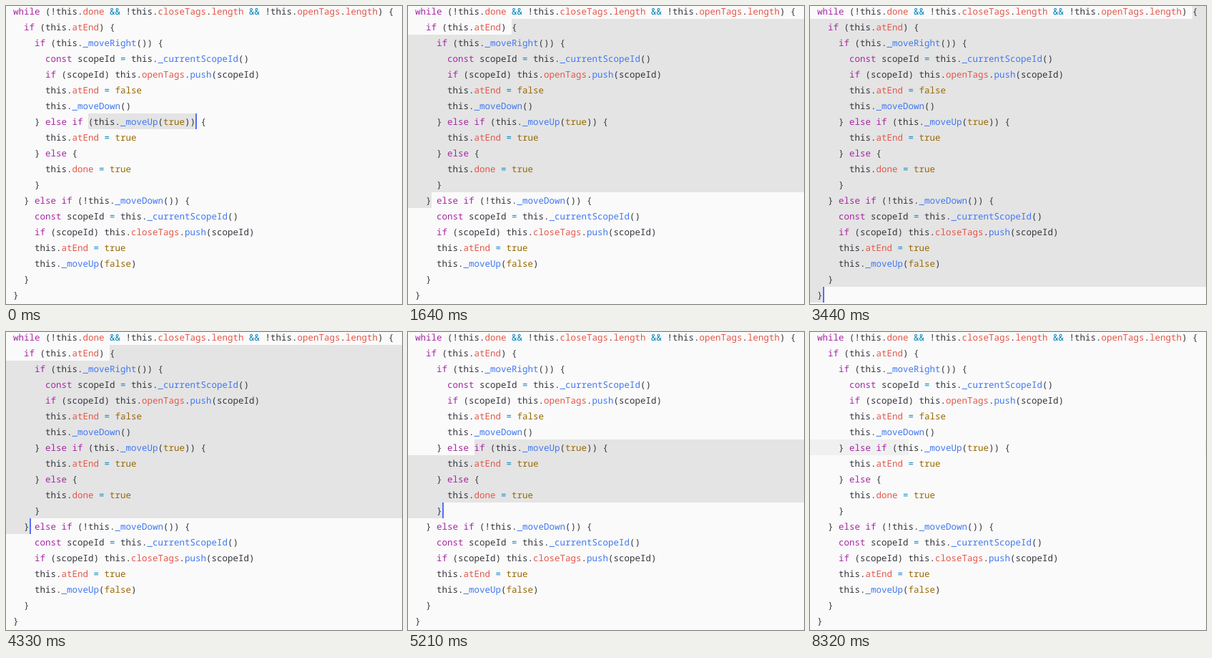
Animation, 554 px wide and 416 px high, one loop 8.57 s. Source, as an HTML page:

```html
<!DOCTYPE html>
<html lang="en">
<head>
<meta charset="utf-8">
<title>Growing and shrinking a code selection</title>
<style>
  html, body { margin: 0; width: 100%; height: 100%; overflow: hidden; background: #fafafa; }
  svg { display: block; width: 554px; height: 416px; }
  text { font: 12.5px "Noto Sans Mono", "DejaVu Sans Mono", monospace; white-space: pre; fill: #34363d; text-rendering: geometricPrecision; }
  .key { fill: #a626a4; }
  .call { fill: #4078f2; }
  .prop { fill: #e45649; }
  .bool { fill: #986801; }
  .op { fill: #0184bc; }
  .sel { fill: #e4e4e4; }
  .line { fill: #f0f0f0; }
  #cursor { fill: #526fff; }
</style>
</head>
<body>
<svg viewBox="0 0 554 416">
  <path id="area"/>
  <g id="code"></g>
  <rect id="cursor" width="2" height="22"/>
</svg>
<script>
const WIDTH = 554, ROW = 22, LOOP = 8570;
const colX = c => Math.round(10 + 7.5 * c);
const rowY = r => r * ROW - 4;
const byId = id => document.getElementById(id);
const area = byId('area'), cursor = byId('cursor');

const source = `while (!this.done && !this.closeTags.length && !this.openTags.length) {
  if (this.atEnd) {
    if (this._moveRight()) {
      const scopeId = this._currentScopeId()
      if (scopeId) this.openTags.push(scopeId)
      this.atEnd = false
      this._moveDown()
    } else if (this._moveUp(true)) {
      this.atEnd = true
    } else {
      this.done = true
    }
  } else if (!this._moveDown()) {
    const scopeId = this._currentScopeId()
    if (scopeId) this.closeTags.push(scopeId)
    this.atEnd = true
    this._moveUp(false)
  }
}`;

const rules = [
  ['key', /^(while|if|else|const)$/],
  ['bool', /^(true|false)$/],
  ['op', /^(&&|=)$/],
  ['call', /^(_\w+|push)$/],
  ['prop', /^(done|atEnd|length|\w+Tags)$/]
];

function paintLine(line, row) {
  const text = document.createElementNS('http://www.w3.org/2000/svg', 'text');
  text.setAttribute('y', rowY(row) + 16);
  for (const m of line.matchAll(/\w+|&&|[^\s\w]/g)) {
    const span = document.createElementNS('http://www.w3.org/2000/svg', 'tspan');
    const rule = rules.find(r => r[1].test(m[0]));
    if (rule) span.setAttribute('class', rule[0]);
    span.setAttribute('x', 10 + 7.5 * m.index);
    span.textContent = m[0];
    text.append(span);
  }
  byId('code').append(text);
}
source.split('\n').forEach(paintLine);

// Syntax nodes, innermost first: start row, start column, end row, end column
const nodes = [
  [7, 17, 7, 17],
  [7, 15, 7, 19],
  [7, 15, 7, 27],
  [7, 15, 7, 33],
  [7, 14, 7, 34],
  [7, 11, 11, 5],
  [2, 4, 11, 5],
  [1, 18, 12, 3],
  [1, 2, 17, 3],
  [0, 70, 18, 1],
  [0, 0, 18, 1]
];
// Key presses: time, node
const keys = [
  [0, 4], [440, 5], [890, 6], [1340, 7], [1940, 8], [2390, 9], [2840, 10],
  [3440, 9], [3880, 8], [4330, 7], [4770, 6], [5210, 5], [5650, 4],
  [6100, 3], [6390, 2], [6830, 1], [7130, 0]
];

const box = (x1, x2, y, h = ROW) => `M${x1} ${y}H${x2}v${h}H${x1}z`;

function selection([r1, c1, r2, c2]) {
  const x1 = colX(c1), x2 = colX(c2);
  if (r1 === r2) return box(x1, x2, rowY(r1));
  return box(x1, WIDTH, rowY(r1)) +
    box(0, WIDTH, rowY(r1 + 1), (r2 - r1 - 1) * ROW) +
    box(0, x2, rowY(r2));
}

function activeLine([row, col], t) {
  const y = rowY(row);
  return t < 8320 ? box(0, WIDTH, y) : box(0, colX(col), y) + box(WIDTH - 1, WIDTH, y);
}

function draw(now) {
  const t = now % LOOP;
  const [start, index] = keys.findLast(k => k[0] <= t);
  const node = nodes[index];
  area.setAttribute('class', index ? 'sel' : 'line');
  area.setAttribute('d', index ? selection(node) : activeLine(node, t));
  cursor.setAttribute('x', colX(node[3]));
  cursor.setAttribute('y', rowY(node[2]));
  // The cursor blinks once it has rested for 300 ms
  const on = t - start < 300 || (t >= 7870 && t < 8320);
  cursor.setAttribute('visibility', on ? 'visible' : 'hidden');
}

const begin = performance.now();
function tick() {
  draw(performance.now() - begin);
  requestAnimationFrame(tick);
}
tick();
</script>
</body>
</html>
```
